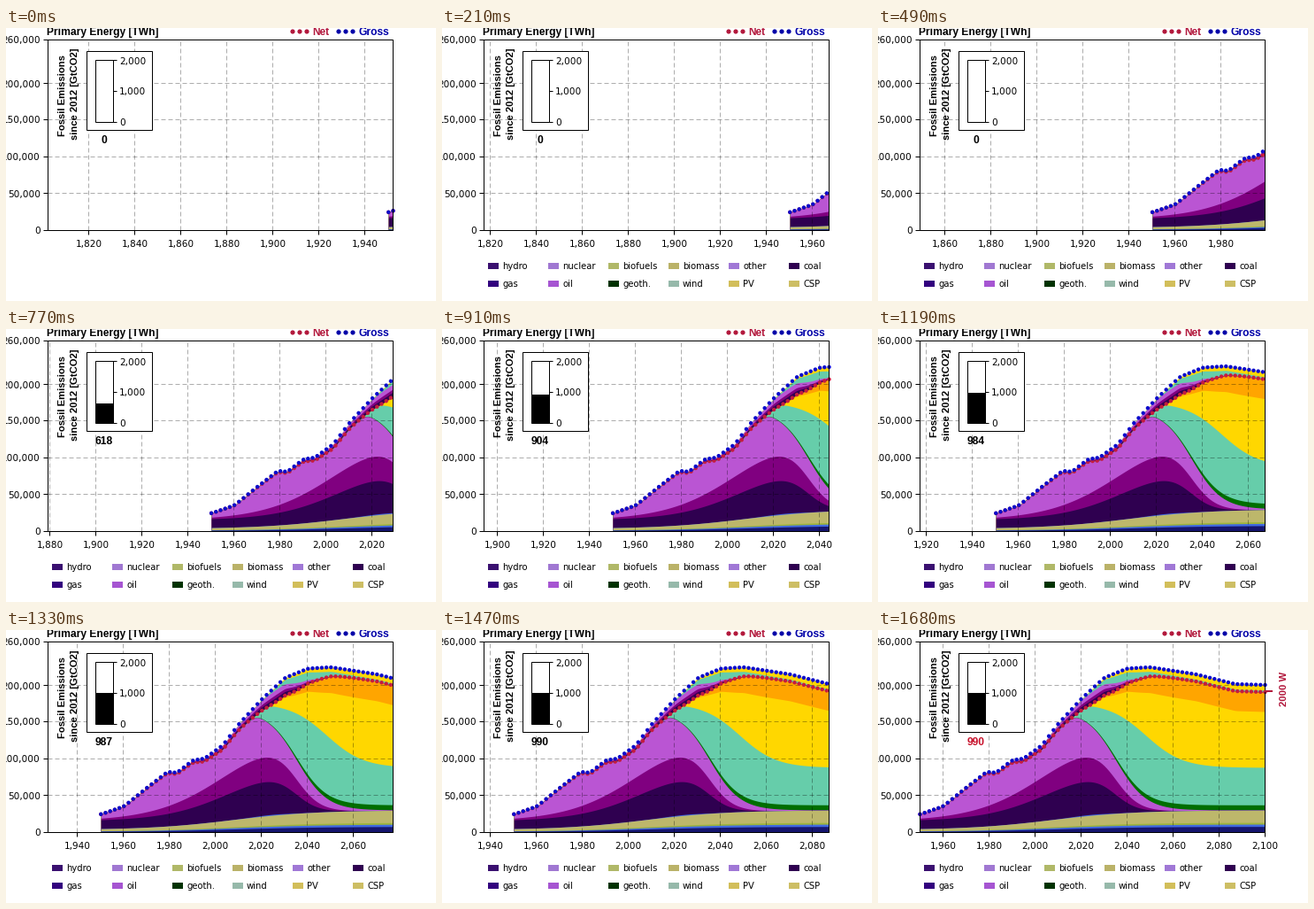
Animation, 486 px wide and 308 px high, one loop 2.17 s. Source, as a matplotlib script:

```python
import numpy as np
import matplotlib.pyplot as plt
from matplotlib.animation import FuncAnimation
from matplotlib.patches import Circle, Rectangle

W, H, DPI = 486, 308, 100
SLOT, SLOTS = 70, 31
LEFT, RIGHT, TOP, BASE = 47, 437, 13, 228
SPAN = 150
RED, NAVY = "#b2183c", "#0000a8"
GOLD, AQUA, ORCHID, PURPLE, INDIGO = ("#ffd700", "#66cdaa", "#ba55d3",
                                      "#800080", "#2f0050")

# The view jumps at these slots, along a piecewise linear pace.
JUMPS = sorted([0, 14, 24, *range(3, 24, 2)])
PACE = [(0, 1952), (3, 1967), (7, 1999), (13, 2044), (15, 2052), (17, 2067),
        (23, 2097), (24, 2100)]
EMITTED = [(2012, 0), (2029, 618), (2044, 904), (2052, 954), (2067, 984),
           (2087, 990), (2100, 990)]
DEMAND = [(1950, 20), (1960, 29), (1970, 50), (1979, 68), (1983, 67),
          (1990, 81), (1995, 83), (2003, 98), (2010, 122), (2020, 150),
          (2030, 174), (2040, 184.5), (2050, 186), (2070, 178), (2087, 167),
          (2100, 166)]

YEARS = np.arange(1950, 2101)


def along(points, x):
    return np.interp(x, *zip(*points))


def rise(mid, width):
    return 1 / (1 + np.exp((mid - YEARS) / width))


def fall(mid, width):
    return 1 - rise(mid, width)


def bump(mid, width):
    return np.exp(-((YEARS - mid) / width) ** 2)


def soft_min(a, b, k):
    return -k * np.logaddexp(-a / k, -b / k)


def build_layers():
    """Band tops in pixels above the axis, from the highest band down."""
    gross = np.pad(along(DEMAND, YEARS), 1, mode="edge")
    gross = np.convolve(gross, [.25, .5, .25], mode="valid")
    gap = 8 * rise(1999, 12) + 12.5 * bump(2032, 14)
    net = gross - gap
    pv = net - 22 * rise(2042, 5)
    wind = soft_min(pv, 73 + 73 * fall(2048, 8), 1)
    oil = soft_min(net, 25 + 113 * fall(2035, 6.5), 3)
    geoth = oil + 5.7 * rise(2036, 6)
    biofuels = 1 + 10 * rise(2008, 20)
    biomass = 3 + 22 * rise(2007, 18)
    coal = biomass + (9.5 + 42 * rise(2006, 13)) * fall(2034, 5)
    gas = coal + 37 * rise(1998, 16) * fall(2035, 5.5)
    fossil = gap * fall(2034, 6)
    layers = [
        (gross, GOLD),
        (net + gap * (1 - .72 * rise(2046, 8)), AQUA),
        (net + fossil, ORCHID),
        (net + .6 * fossil, PURPLE),
        (net + .35 * fossil, INDIGO),
        (net, "#ffa500"),
        (pv, GOLD),
        (wind, AQUA),
        (np.minimum(geoth, net), "#006e00"),
        (oil, ORCHID),
        (gas, PURPLE),
        (coal, INDIGO),
        (biomass + bump(2024, 10), "#4169e1"),
        (biomass, "#bdb76b"),
        (biofuels, "#9db43c"),
        (.82 * biofuels, "#4169e1"),
        (.58 * biofuels, "#15156e"),
    ]
    return gross, net, layers


GROSS, NET, LAYERS = build_layers()

LEGEND = [("hydro", "#3a1070"), ("nuclear", "#a078d2"), ("biofuels", "#b0b868"),
          ("biomass", "#bab268"), ("other", "#a078d6"), ("coal", "#2f0050"),
          ("gas", "#32007e"), ("oil", "#a655d2"), ("geoth.", "#003200"),
          ("wind", "#96b9aa"), ("PV", "#d2be5a"), ("CSP", "#cdbe64")]

fig = plt.figure(figsize=(W / DPI, H / DPI), dpi=DPI, facecolor="white")
ax = fig.add_axes([0, 0, 1, 1])


def text(x, y, s, px=10.5, ha="left", color="black", **kw):
    kw = {"va": "baseline", "family": "DejaVu Sans", "zorder": 9, **kw}
    ax.text(x, y, s, fontsize=px * 72 / DPI, ha=ha, color=color, **kw)


def bold(x, y, s, px=12, **kw):
    text(x, y, s, px, family="Liberation Sans", weight="bold", **kw)


def upright(x, y, s, **kw):
    bold(x, y, s, 11.3, ha="center", va="center", rotation=90, **kw)


def line(x0, y0, x1, y1, color="black", px=1, z=6, **kw):
    ax.plot([x0, x1], [y0, y1], color=color, lw=px * 72 / DPI, zorder=z,
            solid_capstyle="butt", **kw)


def grid(x0, y0, x1, y1):
    line(x0, y0, x1, y1, (0, 0, 0, .32), z=4, dashes=(5, 3))


def rect(x, y, w, h, fill="none", edge="none", z=7):
    ax.add_patch(Rectangle((x, y), w, h, fc=fill, ec=edge, lw=72 / DPI,
                           zorder=z, joinstyle="miter"))


def dot(x, y, r, color):
    ax.add_patch(Circle((x, y), r, fc=color, ec="none", zorder=5))


def draw_areas(end):
    n = end - YEARS[0] + 1
    x = RIGHT + .5 - (end - YEARS[:n]) * (RIGHT - LEFT) / SPAN
    for top, color in LAYERS:
        ax.fill_between(x, BASE, BASE - top[:n], color=color, lw=0, zorder=2)
    for data, color in ((NET, "#c41c40"), (GROSS, "#0c0ccc")):
        for k in range(0, n, 2):
            dot(x[k], BASE - data[k], 2.2, color)


def draw_axes(end):
    for v in (*range(0, 200001, 50000), 260000):
        y = int(BASE - v * (BASE - TOP) / 260000)
        if 0 < v < 260000:
            grid(LEFT, y, RIGHT, y)
        line(LEFT - 5, y, LEFT, y)
        text(39, y + 4.5, f"{v:,}", ha="right")

    start = end - SPAN
    for year in range(-(-start // 20) * 20, end + 1, 20):
        x = int(LEFT + (year - start) * (RIGHT - LEFT) / SPAN)
        if x < RIGHT:
            grid(x, BASE, x, TOP)
        line(x, BASE, x, BASE + 5)
        text(x + .5, 247, f"{year:,}", ha="center")
    rect(LEFT, TOP, RIGHT - LEFT, BASE - TOP, edge="black", z=6)


def draw_gauge(end, final):
    amount = along(EMITTED, end)
    rect(91, 26, 74, 89, "white", "black")
    rect(101, 36, 20, 70, "white", "black")
    rect(101, 106 - amount * .035, 20, amount * .035, "black")
    for v in (0, 1000, 2000):
        y = int(106 - v * .035)
        line(121, y, 125, y, z=8)
        text(128, y + 4.5, f"{v:,}")
    bold(111, 130, f"{amount:.0f}", ha="center",
         color="#c8142d" if final else "black")
    upright(64, 76, "Fossil Emissions")
    upright(78, 74, "since 2012 [GtCO2]")


def draw_header():
    bold(46, 8, "Primary Energy [TWh]")
    for x, name, color in ((324, "Net", RED), (376, "Gross", NAVY)):
        for k in range(3):
            dot(x + 8 * k, 4, 2.6, color)
        bold(x + 22, 8, name, color=color)


def draw_legend():
    for k, (name, color) in enumerate(LEGEND):
        x, y = 52 + k % 6 * 68, 265 + k // 6 * 20
        rect(x, y, 12, 7, color)
        text(x + 16, y + 7, name, 10)


def draw(i):
    slot = max(j for j in JUMPS if j <= i)
    end = round(along(PACE, slot))
    final = slot == JUMPS[-1]
    ax.cla()
    ax.set(xlim=(0, W), ylim=(H, 0))
    ax.axis("off")
    draw_areas(end)
    draw_axes(end)
    draw_gauge(end, final)
    draw_header()
    if slot > 0:
        draw_legend()
    if final:
        line(RIGHT, 69, 446, 69, RED, 2)
        upright(458.5, 66.5, "2000 W", color=RED)
    return []


anim = FuncAnimation(fig, draw, frames=SLOTS, interval=SLOT,
                     init_func=lambda: draw(0), repeat=True, repeat_delay=0)
plt.show()
```
